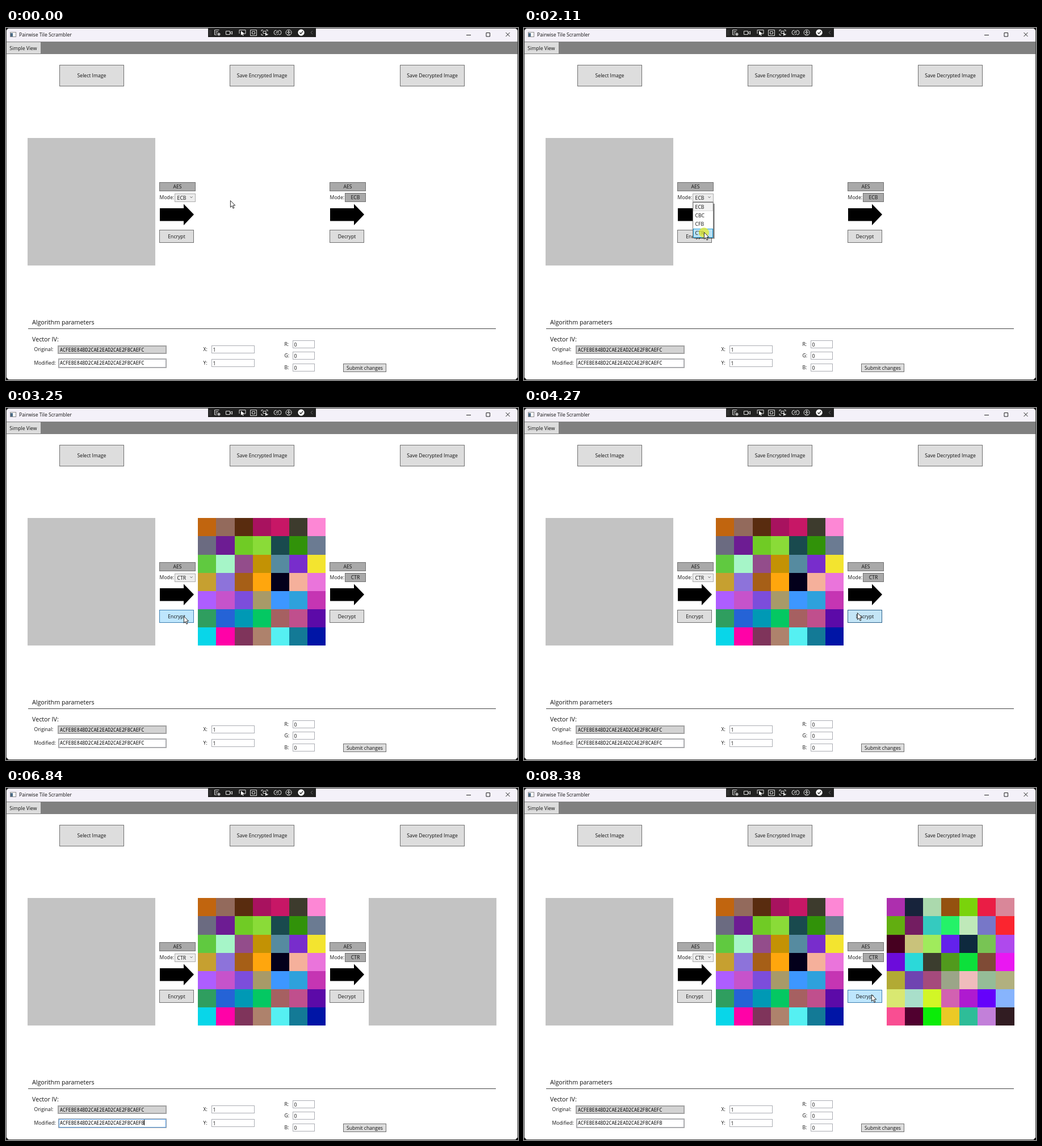
An HTML page that plays this animation: 902x621 px, repeating every 9720 ms.

```html
<!DOCTYPE html>
<html lang="en">
<head>
<meta charset="utf-8">
<title>Pairwise Tile Scrambler</title>
<style>
  html, body { margin: 0; width: 100%; height: 100%; overflow: hidden; background: #111; }
  svg { display: block; }
  text { font: 8.65px "Open Sans", "Noto Sans", sans-serif; fill: #111; white-space: pre; }
  .mono { font: 8.25px "Noto Sans Mono", "DejaVu Sans Mono", monospace; fill: #000; }
  .head { font-size: 10.7px; }
  rect { shape-rendering: crispEdges; }
</style>
</head>
<body>
<svg width="902" height="621" viewBox="0 0 902 621">
  <g id="base"></g>
  <g id="live"></g>
</svg>
<script>
const LOOP = 9720, STEP = 70;
const GRAY = '#c3c3c3', FACE = '#dddddd', EDGE = '#707070', LOCKED = '#a9a9a9';
const IV = 'ACFEBE84BD2CAE2EAD2CAE2FBCAEF';
const MODES = ['ECB', 'CBC', 'CFB', 'CTR'];

const ENCRYPTED = `c1650f 936a5c 592c0f a8125f c71766 3d3b2d fd87d5
  6b6b81 6d1c93 70cb25 8adb38 194a4e 319209 6b7b92
  60c940 a6f5c8 934d8b c39204 568ba0 782dcc f3e42f
  c6a030 8d73da a65f17 ffa60d 03001b f5b09b ea74db
  ae5dff c653cb 7c4ddb a89a68 3d97ff 2ea1dc c535b3
  2f9e5f 2563d6 0099b5 04c862 a66061 c04f8d 5c0aa8
  08d6e9 ff02a7 7f345b ae826c 55f0f2 137a96 0015a6`.split(/\s+/);
const SCRAMBLED = `ad2fae 17233b abd9ad 94520f 7ad30b ea1d45 d98799
  62ae10 731d61 35cabf 24f268 bfe9b9 7777c8 fb252f
  460020 c9c27b a0eb5c 6322ec 0e293e 78c454 af49ed
  6c0cdb 2bd9d9 3b3d2e 519a1d 0ce03b 7f4b36 ea17f2
  b2aa34 6f44b1 a54a7c 9ba588 efbcbc 95bc97 b1b07f
  d9e871 a9dfca d2f626 d261b1 af1ad0 6502fb 87b4fd
  f94e92 50002f 0bec08 ebc926 2ebd98 c280d9 311c22`.split(/\s+/);

// Pointer keys: time, x, y
const PATH = [
  [0, 395, 304], [250, 395, 304], [1010, 325, 298], [1090, 325, 298],
  [1840, 317, 360], [2440, 317, 360], [2650, 313, 367], [3380, 313, 367],
  [4200, 587, 361], [4600, 587, 361], [5090, 253, 577], [5510, 254, 588],
  [5640, 254, 588], [5710, 255, 588], [7360, 255, 588], [8040, 612, 364],
  [LOOP, 612, 364]
];

const rect = (x, y, w, h, fill, more = '') =>
  `<rect x="${x}" y="${y}" width="${w}" height="${h}" fill="${fill}" ${more}/>`;
const box = (x, y, w, h, fill, stroke) =>
  rect(x + .5, y + .5, w - 1, h - 1, fill, `stroke="${stroke}"`);
const text = (x, y, s, cls = '') => `<text x="${x}" y="${y}" class="${cls}">${s}</text>`;
const mid = (x, y, s) => `<text x="${x}" y="${y}" text-anchor="middle">${s}</text>`;
const path = (d, stroke, fill = 'none', more = '') =>
  `<path d="${d}" stroke="${stroke}" fill="${fill}" ${more}/>`;
const button = (x, y, w, h, label, fill = FACE, edge = EDGE) =>
  box(x, y, w, h, fill, edge) + mid(x + w / 2, y + h / 2 + 3.2, label);
const within = (t, a, b) => t >= a && t < b;
const inside = (p, x, y, w, h) => within(p.x, x, x + w) && within(p.y, y, y + h);

function grid(x0, y0, colors) {
  const size = 225 / 7, at = (o, i) => Math.round(o + i * size);
  return colors.map((c, i) => {
    const col = i % 7, row = Math.floor(i / 7), x = at(x0, col), y = at(y0, row);
    return rect(x, y, at(x0, col + 1) - x, at(y0, row + 1) - y, '#' + c);
  }).join('');
}

function toolbar() {
  return rect(356, 0, 190, 16, '#202020') + path(
    'M358.5 4v9M361 4v9', '#666', 'none', 'stroke-dasharray="1 1"') + path(
    'M367.5 3.5h8M367.5 3.5v8.500h4M369 6.500h5M369 9h3M375 8v6M372 11h6M373 9l4 4M377 9l-4 4' +
    'M387.500 5.500h7v6h-7zM395 8l3.500-2v5L395 9' +
    'M411 10V3.500h11V10h-2' +
    'M430.500 3.500h11v10h-11zM433.500 6.500h5v4h-5z' +
    'M450 6V3.500h3M458 3.500h3V6M450 10v2.500h3M453 5.500h5v4h-5zM458 12h3v-2' +
    'M476 4a4 4 0 0 0 0 8M481 4a4 4 0 0 1 0 8M476 6l5-1M475 9l6-2M477 12l4-2', '#ddd') +
    path('M414 5v8l2-2 1.500 3 1-1-1-2.500h3zM457 8v6l2-2h2z', 'none', '#fff') +
    '<circle cx="498" cy="8" r="5" fill="none" stroke="#ddd"/><circle cx="498" cy="5.500" r="1" fill="#fff"/>' +
    path('M495 7.500h6M498 7.500v2l-2 2.500M498 9.500l2 2.500', '#ddd') +
    '<circle cx="520" cy="8" r="5.700" fill="#fff"/>' +
    path('M517.500 8l2 2.300 3.500-4.600', '#222', 'none', 'stroke-width="1.3"') +
    path('M540 5l-3 3 3 3', '#666');
}

function stage(x) {
  return button(x, 272, 64, 16, 'AES', LOCKED) + text(x + .6, 301.5, 'Mode:') +
    path(`M${x + 1} 318h42v-7.500l18 18.500-18 19v-7.500h-42z`, 'none', '#000');
}

function input(x, y, w, value) {
  return box(x, y, w, 14, '#fff', '#abadb3') + text(x + 2.6, y + 10.5, value);
}

function baseLayer() {
  return rect(.5, .5, 901, 620, '#fff', 'rx="6" stroke="#444"') +
    path('M1 24V6q0-5 5-5h890q5 0 5 5v18z', 'none', '#f4f1f9') +
    box(7, 7, 11, 9, '#fff', '#8a8a8a') + rect(8, 9, 4, 6, '#4a6a86') +
    text(23, 15.3, 'Pairwise Tile Scrambler') +
    path('M811 12.500h8M846 8.500h6.500v6.500h-6.500zM880.500 8l7 7M887.500 8l-7 7', '#222') +
    toolbar() +
    rect(1, 24, 900, 22, '#808080') + rect(1, 25, 60, 20, FACE) + text(6.3, 38.5, 'Simple View') +
    ['Select Image', 'Save Encrypted Image', 'Save Decrypted Image']
      .map((s, i) => button(94 + 300 * i, 65, 114, 38, s)).join('') +
    rect(38, 194, 225, 225, GRAY) + stage(270) + stage(570) +
    text(46, 523, 'Algorithm parameters', 'head') + rect(39, 530, 824, 1, '#444') +
    text(46, 553, 'Vector IV:', 'head') +
    text(49.5, 570, 'Original:') + text(49.5, 594, 'Modified:') +
    rect(91, 560, 192, 15, '#a3a3a3') + rect(93, 562, 188, 11, '#d3d3d3') +
    text(95, 570.5, IV + 'C', 'mono') +
    text(347.5, 570, 'X:') + input(362, 560, 76, 1) +
    text(347.5, 594, 'Y:') + input(362, 584, 76, 1) +
    ['R:', 'G:', 'B:'].map((s, i) =>
      text(490.5, 560.5 + 20.5 * i, s) + input(505, Math.round(551 + 20.3 * i), 39, 0)).join('') +
    button(594, 592, 76, 15, 'Submit changes');
}

function pointer(t) {
  const i = PATH.findIndex((k, n) => n && t < k[0]);
  const [a, x, y] = PATH[i - 1], [b, x2, y2] = PATH[i];
  const u = Math.floor((t - a) / STEP) * STEP / (b - a), e = u * u * (3 - 2 * u);
  return { x: Math.round(x + (x2 - x) * e), y: Math.round(y + (y2 - y) * e) };
}

function actionButton(x, label, p, live, pressed) {
  const over = live && inside(p, x, 356, 61, 23);
  return button(x, 356, 61, 23, label,
    pressed ? '#c4e5f6' : over ? '#bee6fd' : FACE,
    pressed ? '#2c628b' : over ? '#3c7fb1' : EDGE);
}

function combo(t, p) {
  const over = t < 1160 && inside(p, 297, 292, 37, 15);
  return box(297, 292, 37, 15, over ? '#e3f0fc' : '#ececec', over ? '#7eb4ea' : '#acacac') +
    text(301.6, 303, t < 2240 ? 'ECB' : 'CTR') + path('M324.500 297.500l2 2 2-2', '#555');
}

function dropdown(p) {
  const hot = Math.floor((p.y - 308) / 15.2);
  return rect(300, 310, 36, 62, '#000', 'opacity=".3"') + rect(300, 310, 35, 61, '#000', 'opacity=".35"') +
    box(297, 307, 37, 63, '#fff', '#777') +
    MODES.map((m, i) => {
      const y = Math.round(308 + 15.2 * i);
      const back = i === hot ? box(298, y, 35, 16, '#b9e1f4', '#26a0da')
        : i ? '' : box(298, y, 35, 15, '#f3f3f3', '#dadada');
      return back + text(301.6, 319 + 15.2 * i, m);
    }).join('');
}

function modifiedField(t) {
  const focus = within(t, 5510, 8240);
  const last = t < 6370 ? 'C' : t < 6770 ? '' : 'B';
  const caret = focus && !within(t, 6040, 6370) && !within(t, 7430, 7960);
  return rect(92, 583, 191, 17, '#a9a9a9') +
    box(93, 584, 189, 15, '#fff', focus ? '#569de5' : '#abadb3') +
    text(95, 593.5, IV + last, 'mono') +
    (caret ? rect(last ? 243 : 239, 585, 1, 10, '#000') : '');
}

function cursor(t, p) {
  if (within(t, 6840, 7430)) return '';
  if (inside(p, 93, 584, 188, 15))
    return path(`M${p.x - 2} ${p.y - 5.5}h4M${p.x} ${p.y - 5.5}v12M${p.x - 2} ${p.y + 6.5}h4`, '#222', 'none', 'stroke-width=".8"');
  return path('M.4.5V12.300l2.700-2.600 1.900 4.500 1.900-.8L5 9h3.700z', '#111', '#fff',
    `stroke-width=".9" transform="translate(${p.x} ${p.y})"`);
}

function liveLayer(t) {
  const p = pointer(t);
  const clicking = within(t, 1160, 1230) || within(t, 2040, 2240);
  return (t >= 3250 ? grid(338.3, 194.3, ENCRYPTED) : '') +
    (t >= 8380 ? grid(638.6, 194.3, SCRAMBLED) : t >= 4340 ? rect(639, 194, 225, 225, GRAY) : '') +
    button(597, 291, 37, 16, t < 3250 ? 'ECB' : 'CTR', LOCKED) +
    actionButton(270, 'Encrypt', p, t >= 2310, within(t, 3180, 3250)) +
    actionButton(570, 'Decrypt', p, true, within(t, 4270, 4340) || within(t, 8240, 8380)) +
    modifiedField(t) + combo(t, p) +
    (within(t, 1160, 2240) ? dropdown(p) : '') +
    (clicking ? `<circle cx="${p.x}" cy="${p.y + 1}" r="9" fill="#e6ea28" opacity=".72"/>` : '') +
    cursor(t, p);
}

const live = document.getElementById('live');
document.getElementById('base').innerHTML = baseLayer();
const start = performance.now();
let shown = '';

function draw() {
  const markup = liveLayer((performance.now() - start) % LOOP);
  if (markup !== shown) live.innerHTML = shown = markup;
  requestAnimationFrame(draw);
}
draw();
</script>
</body>
</html>
```
